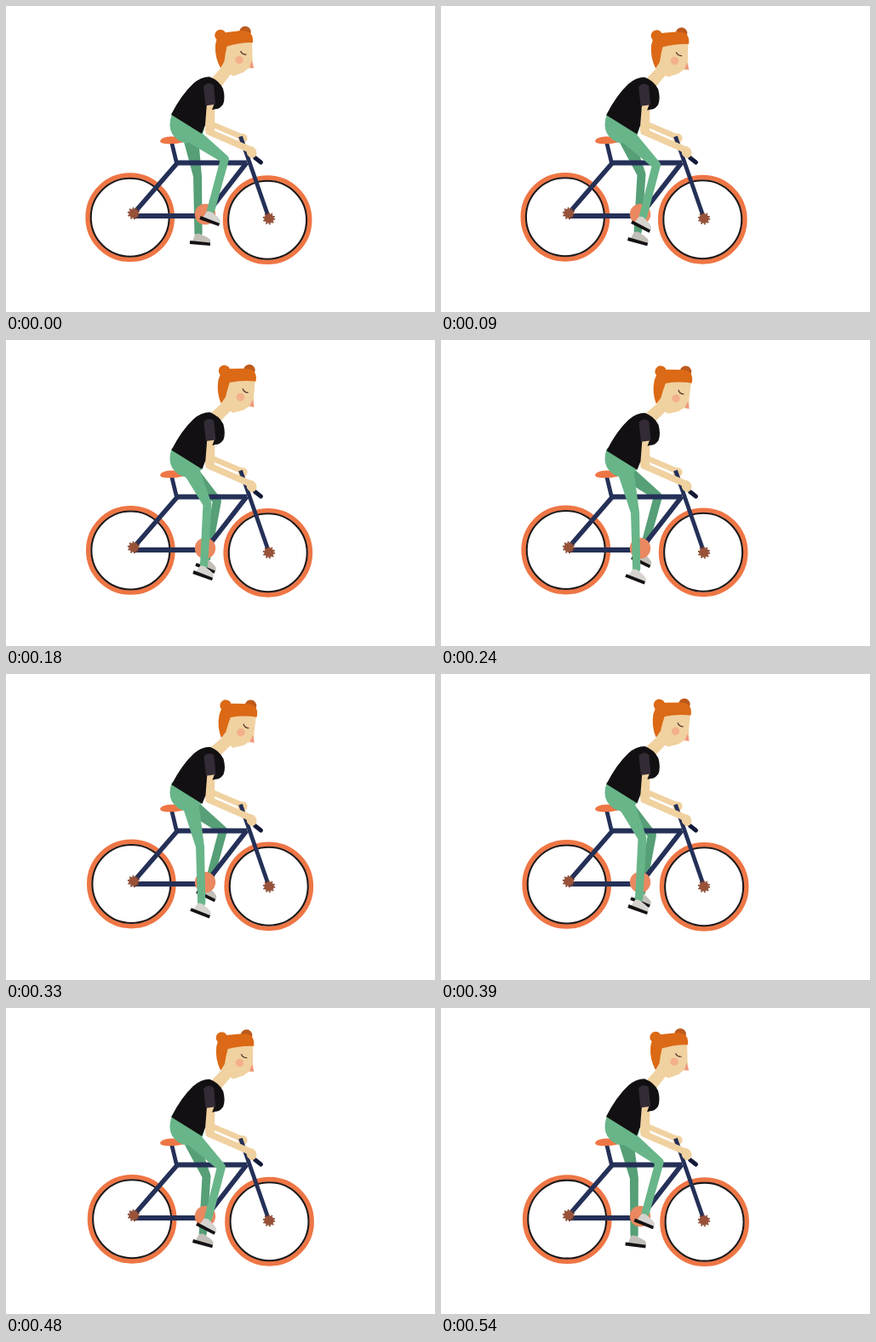
Recreate the animation shown at these times as an HTML page. Size 504 px wide and 360 px high, loop 570 ms.

```html
<!DOCTYPE html>
<html lang="en">
<head>
<meta charset="utf-8">
<title>Cyclist</title>
<style>
html, body { margin: 0; width: 100%; height: 100%; overflow: hidden; background: #fff; }
svg { display: block; width: 100vw; height: 100vh; }
.tube { fill: none; stroke: #243057; }
.near { fill: #68b589; }
.far { fill: #569f77; }
.skin { fill: #f0d1a0; }
.limb { fill: none; stroke: #f0d1a0; stroke-linejoin: round; }
.hair { fill: #db6915; }
</style>
</head>
<body>
<svg viewBox="0 0 504 360">
  <defs>
    <g id="wheel" fill="none">
      <circle r="49.6" stroke="#ee7645" stroke-width="5.6"/>
      <circle r="46" stroke="#1d1718" stroke-width="2.1"/>
    </g>
    <g id="hub">
      <circle r="5.8" fill="#98523a"/>
      <circle r="6.3" fill="none" stroke="#7c4029" stroke-width="1.8" stroke-dasharray="1.6 2.35"/>
    </g>
    <path id="upper" d="M3-1L5-9.500Q9-12.500 13-10Q17-9 21-7Q25-5 24-1Z"/>
    <path id="sole" d="M0-2L24-1.600L24 2L0 2Z" fill="#141214"/>
  </defs>

  <use id="rear" href="#wheel"/>
  <use id="front" href="#wheel"/>

  <path class="limb" stroke-width="6.600" d="M243 139.500L277 154"/>
  <circle class="skin" cx="278" cy="155.500" r="5.600"/>

  <path id="farLeg" class="far"/>
  <g id="farFoot"><use href="#upper" fill="#c2beb8"/><use href="#sole"/></g>

  <path class="tube" stroke-width="6.200" d="M150 247H228M200 184.500H283"/>
  <path class="tube" stroke-width="5.600" d="M150 244L201 185M238 242L283 184"/>
  <path class="tube" stroke-width="4.800" d="M194.500 160L201 187M275.500 153.500L309 250"/>
  <circle cx="234" cy="245" r="12.200" fill="#ea8860"/>
  <use href="#hub" x="150" y="244"/>
  <use href="#hub" x="309" y="250"/>
  <path d="M181 158.500Q183 154 194 153.500L210 154V160Q198 163 187 162Q181 161.500 181 158.500Z" fill="#ee7645"/>
  <path d="M292.500 178.500L299.500 184" fill="none" stroke="#131a38" stroke-width="5" stroke-linecap="round"/>

  <path id="nearLeg" class="near"/>
  <g id="nearFoot"><use href="#upper" fill="#d6d3cf"/><use href="#sole"/></g>
  <path class="near" d="M195 127Q190 141 195 150Q201 160 212 161.500Q224 160 231 151L233 144Z"/>

  <g id="head">
    <path class="skin" d="M240 87L256 69L265 79L251 97Z"/>
    <path class="skin" d="M252 71L257 44L289 40L289.500 62L291 73L284.500 73.500L279 78L267 82.500L258 77Z"/>
    <path d="M288.500 64.500L291.200 73.200L286 72.500Z" fill="#f0967f"/>
    <circle cx="274" cy="63.200" r="4.700" fill="#f3b08b"/>
    <path d="M275.500 53Q277.500 57.500 282.500 57" fill="none" stroke="#4c3329" stroke-width="1.200"/>
    <circle cx="281" cy="30.500" r="6.800" fill="#bd5a1d"/>
    <circle class="hair" cx="252" cy="34.500" r="6.800"/>
    <path class="hair" d="M246 46Q247 34 259 31L276 29Q289 28 290 39L290 43Q275 42.500 259.500 47.500Q257.500 56 256.500 65L252 73Q245 60 246 46Z"/>
  </g>

  <path class="limb" stroke-width="11" d="M240 112L239.500 147"/>
  <path class="limb" stroke-width="7.800" stroke-linecap="round" d="M238.500 148L289 170"/>
  <ellipse class="skin" cx="288.500" cy="172" rx="5.800" ry="7" transform="rotate(-20 288.500 172)"/>
  <g id="shirt">
    <path d="M194 127.500Q206 104 220 91Q229 83 239 83Q250 87 255 97Q258 108 255 115.500Q251 121 246 121L242 122L245 114H236L234 140L230 150Z" fill="#121012"/>
    <path d="M232 94Q238 88 244 93L246 115.500L234.500 117Z" fill="#332b35"/>
  </g>
</svg>
<script>
const LOOP = 570, STEP = 30;
const $ = id => document.getElementById(id);

// Knee x, y, heel x, y, sole angle: near leg, then far leg
const times = [0, 90, 180, 240, 285];
const poses = [
  [257, 180, 228, 249, 20, 225, 200, 216, 278, 5],
  [253, 187, 224, 254, 27, 235.5, 198, 219.5, 274, 15],
  [236.5, 193, 220, 273, 20, 248, 189, 223, 264, 22],
  [228, 203, 217, 277, 21, 255, 184, 224, 256, 26],
  [226, 205, 216, 278, 21, 257, 183, 225, 254, 27]
];

function slope(i, k) {
  if (i === 0 || i === times.length - 1) return 0;
  return (poses[i + 1][k] - poses[i - 1][k]) / (times[i + 1] - times[i - 1]);
}

function poseAt(s) {
  let i = 0;
  while (i < times.length - 2 && s > times[i + 1]) i++;
  const d = times[i + 1] - times[i], u = (s - times[i]) / d, v = 1 - u;
  return poses[i].map((a, k) =>
    a * (1 + 2 * u) * v * v + poses[i + 1][k] * u * u * (3 - 2 * u) +
    d * u * v * (v * slope(i, k) - u * slope(i + 1, k)));
}

function taper(a, b, ra, rb) {
  const dx = b[0] - a[0], dy = b[1] - a[1], len = Math.hypot(dx, dy);
  const nx = -dy / len, ny = dx / len;
  const at = (p, r) => (p[0] + nx * r).toFixed(2) + ' ' + (p[1] + ny * r).toFixed(2);
  return `M${at(a, ra)}L${at(b, rb)}A${rb} ${rb} 0 0 0 ${at(b, -rb)}L${at(a, -ra)}Z`;
}

function drawLeg(name, hip, hipR, [kx, ky, hx, hy, deg]) {
  const r = deg * Math.PI / 180, c = Math.cos(r), s = Math.sin(r);
  const ankle = [hx + 9 * c + 12 * s, hy + 9 * s - 12 * c];
  const knee = [kx, ky];
  $(name + 'Leg').setAttribute('d', taper(hip, knee, hipR, 5) + taper(knee, ankle, 5, 4.6));
  $(name + 'Foot').setAttribute('transform', `translate(${hx} ${hy}) rotate(${deg})`);
}

const move = (id, x, y) => $(id).setAttribute('transform', `translate(${x} ${y})`);

function draw(t) {
  const c = Math.cos(2 * Math.PI * t / LOOP), lean = (1 - c) / 2;
  const p = poseAt(Math.min(t, LOOP - t));
  drawLeg('near', [216, 150], 10, p.slice(0, 5));
  drawLeg('far', [217, 155], 9, p.slice(5));

  const u = t / (LOOP - STEP), drift = 2.5 * u * u * (3 - 2 * u);
  move('rear', 145.7 + drift, 247.8 + 0.9 * c);
  move('front', 307.1 + drift, 250.7 + c);

  move('shirt', 0.5 * lean, 0.3 + 2.5 * lean);
  $('head').setAttribute('transform', `translate(0 ${4.3 * lean}) rotate(${8.5 * lean} 265 78)`);
}

const start = performance.now();
function tick() {
  const t = (performance.now() - start) % LOOP;
  draw(Math.floor(t / STEP) * STEP);
  requestAnimationFrame(tick);
}
tick();
</script>
</body>
</html>
```
